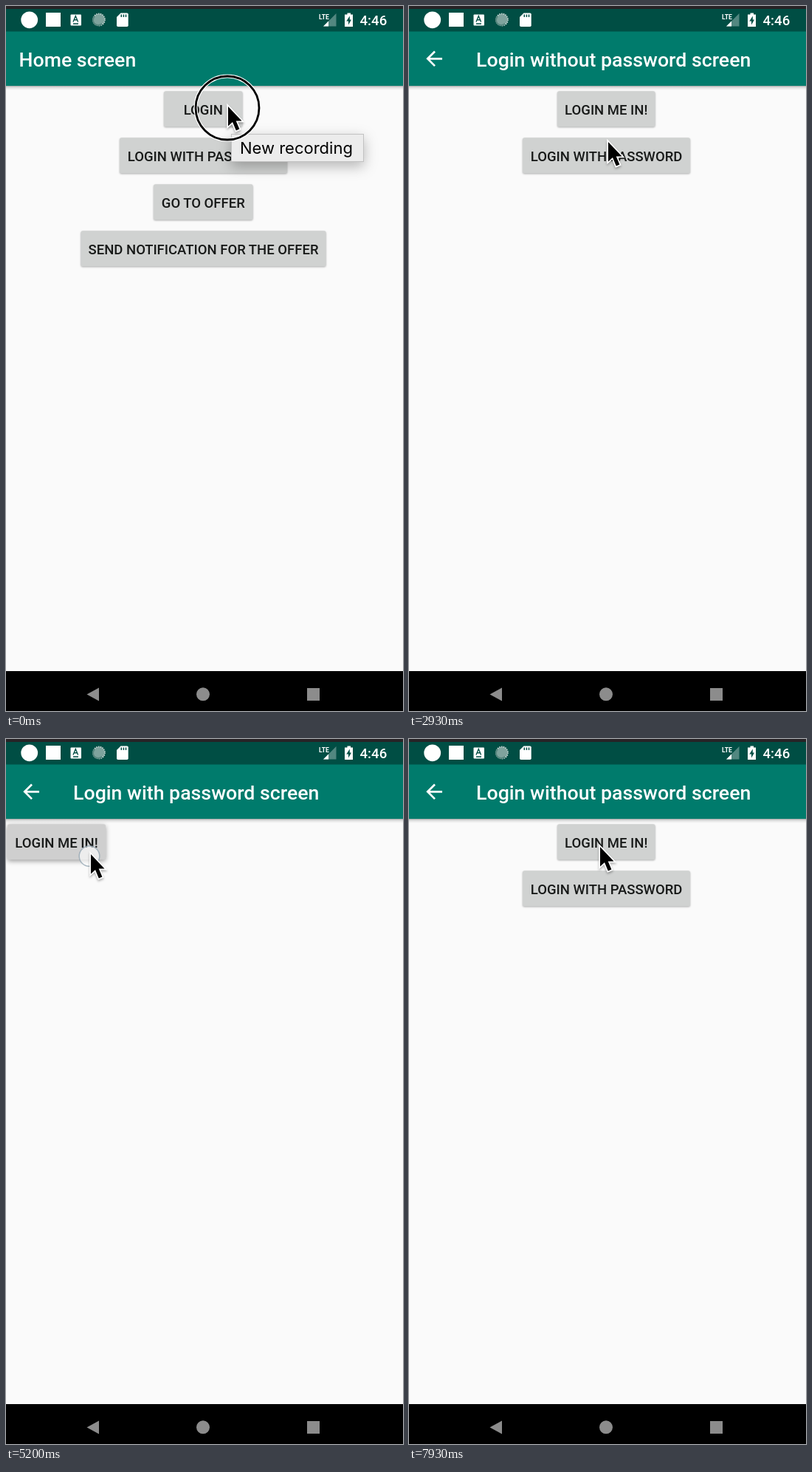
An HTML page that plays this animation: 538x954 px, repeating every 8 s.

```html
<!DOCTYPE html>
<html lang="en">
<head>
<meta charset="utf-8">
<title>Login flow</title>
<style>
  html, body { margin: 0; width: 100%; height: 100%; overflow: hidden; background: #fafafa; }
  svg { display: block; width: 538px; height: 954px; }
  text { font-family: Roboto, sans-serif; font-weight: 500; }
  .title { font-size: 26.7px; fill: #fff; }
  .label { font-size: 18.5px; fill: #171918; text-anchor: middle; }
  .face { fill: #d0d2d1; filter: drop-shadow(0 1.5px 1.2px rgba(0,0,0,.3)); }
  .pressed .face { fill: #cfcfcf; filter: drop-shadow(0 2px 3px rgba(0,0,0,.38)); }
  .tip { filter: drop-shadow(0 6px 9px rgba(0,0,0,.28)); }
  .tip text { font: 400 22px Inter, sans-serif; }
  .pointer { filter: drop-shadow(0 2px 1.5px rgba(0,0,0,.3)); }
</style>
</head>
<body>
<svg viewBox="0 0 538 954">
  <defs>
    <linearGradient id="barShadow" x2="0" y2="1">
      <stop stop-color="#000" stop-opacity=".32"/>
      <stop offset=".4" stop-color="#000" stop-opacity=".1"/>
      <stop offset="1" stop-color="#000" stop-opacity="0"/>
    </linearGradient>
  </defs>
  <g id="screens"></g>

  <path d="M0 0H538V4H0Z" fill="#272326"/>
  <g id="status" fill="#fff">
    <circle cx="31.7" cy="18.8" r="11.4"/>
    <rect x="54" y="9" width="20" height="19"/>
    <rect x="87.5" y="11.5" width="14.5" height="15" rx="1"/>
    <path d="M91 21.5L94.3 13.5L97.6 21.5M92.3 18.7H96.3M91 24H98" fill="none" stroke="#004e44" stroke-width="1.4"/>
    <circle cx="126" cy="18.5" r="8" fill="#7fa39d"/>
    <circle cx="126" cy="18.5" r="8" fill="none" stroke="#c6d6d3" stroke-width="1.8" stroke-dasharray="1.5 1.3"/>
    <path d="M120 14A7 7 0 0 0 130 24" fill="none" stroke="#55857d" stroke-width="2"/>
    <path d="M155.5 9.5H164Q165.7 9.5 165.7 11.2V26.3Q165.7 28 164 28H151.8Q150 28 150 26.3V15Z"/>
    <path d="M156.3 11.5V15M159.4 11.5V15M162.5 11.5V15" stroke="#004e44" stroke-width="1.5"/>
    <text x="424" y="17.5" font-size="8.6" style="font-weight:700">LTE</text>
    <path d="M447.5 10V27.5H430Z" opacity=".32"/>
    <path d="M437 20.5V27.5H430Z"/>
    <path d="M462.5 9.5H467V11.5H470V28H459V11.5H462.5Z"/>
    <path d="M465.8 13.5L461.3 20.5H464V25.5L468 18.5H465.8Z" fill="#004e44"/>
    <text x="479.5" y="25.8" font-size="18.7">4:46</text>
  </g>

  <path d="M0 900H538V954H0Z"/>
  <g fill="#8c8c8c">
    <path d="M109.5 931.5L126 922.5V940.5Z"/>
    <circle cx="267" cy="931.3" r="9"/>
    <rect x="408" y="923" width="17" height="17"/>
  </g>

  <g id="tip" class="tip">
    <rect x="305.5" y="173.5" width="179" height="37" fill="#ececec" stroke="#c2c2c2"/>
    <text x="317" y="200">New recording</text>
  </g>
  <g id="cursor">
    <circle id="spot" cx="-2" cy="2.5" r="13.8" fill="#fff" fill-opacity=".62" stroke="#8fa3b0" stroke-opacity=".75" stroke-width="1.5"/>
    <g id="ring" fill="none">
      <circle cx="-1" cy="2" r="43" stroke="#fff" stroke-width="5"/>
      <circle cx="-1" cy="2" r="43" stroke="#000" stroke-width="2.8"/>
    </g>
    <path class="pointer" d="M0 0V26.5L6 21L10.8 32.5L15.4 30.5L10.7 19.6H18.5Z" stroke="#fff" stroke-width="3.4" paint-order="stroke"/>
  </g>
</svg>
<script>
const LOOP = 8000;
const $ = id => document.getElementById(id);

// Buttons: [label, left, top, width]
const screens = {
  home: { title: 'Home screen', buttons: [
    ['LOGIN', 214, 115, 106.5],
    ['LOGIN WITH PASSWORD', 154, 178, 227],
    ['GO TO OFFER', 200, 241, 134.5],
    ['SEND NOTIFICATION FOR THE OFFER', 101.5, 304, 332]] },
  quick: { title: 'Login without password screen', back: true, buttons: [
    ['LOGIN ME IN!', 201, 115, 132.5],
    ['LOGIN WITH PASSWORD', 154, 178, 227]] },
  secret: { title: 'Login with password screen', back: true, buttons: [
    ['LOGIN ME IN!', 2, 115, 133]] }
};

const buttonMarkup = ([label, x, y, w]) => `<g class="button">
  <rect class="face" x="${x}" y="${y + .3}" width="${w}" height="48" rx="2.5"/>
  <text class="label" x="${x + w / 2}" y="${y + 31.5}">${label}</text></g>`;

const screenMarkup = ([id, { title, back, buttons }]) => `<g id="${id}">
  <path d="M0 0H538V1000H0Z" fill="#fafafa"/>
  <path d="M0 0H538V35H0Z" fill="#004e44"/>
  <path d="M0 34.5H538V108H0Z" fill="#007b6c"/>
  <path d="M0 108H538V114H0Z" fill="url(#barShadow)"/>
  ${back ? '<path d="M45 71.3H26M35 61.5L25.2 71.3L35 81.1" fill="none" stroke="#fff" stroke-width="2.7"/>' : ''}
  <text class="title" x="${back ? 91 : 17.5}" y="81.5">${title}</text>
  ${buttons.map(buttonMarkup).join('')}</g>`;

$('screens').innerHTML = Object.entries(screens).map(screenMarkup).join('');

// Pointer path: [time, x, y]
const path = [
  [0, 301, 136], [200, 301, 136], [870, 285, 143], [1500, 281, 145], [2250, 281, 145],
  [2930, 270, 184], [3450, 264.5, 204], [3700, 264, 205], [4400, 264, 205],
  [5120, 115, 156], [5750, 115, 156], [6650, 267, 166], [6950, 267, 166],
  [7200, 259, 146], [LOOP, 259, 146]
];

// Each tap opens a screen, or closes the current one to show the one below.
const taps = [
  { at: 1850, from: 'home', to: 'quick', button: 0 },
  { at: 4190, from: 'quick', to: 'secret', button: 1 },
  { at: 5150, from: 'secret', to: 'home', button: 0, closing: true },
  { at: 7250, from: 'home', to: 'quick', button: 0 }
];
const HOLD = 110, SLIDE = 74;

const clamp = v => Math.max(0, Math.min(1, v));
const progress = (t, start, length) => clamp((t - start) / length);
const smooth = p => p * p * (3 - 2 * p);
const easeOut = (p, power) => 1 - (1 - p) ** power;

function pointerAt(t) {
  const i = path.findIndex(k => k[0] > t);
  const [t0, x0, y0] = path[i - 1], [t1, x1, y1] = path[i];
  const p = smooth(progress(t, t0, t1 - t0));
  return [x0 + (x1 - x0) * p, y0 + (y1 - y0) * p];
}

function place(id, alpha, dy = 0) {
  const node = $(id);
  node.style.display = alpha > 0 ? '' : 'none';
  node.setAttribute('opacity', alpha);
  node.setAttribute('transform', `translate(0 ${dy})`);
}

function drawScreens(t, tap) {
  const shown = { home: [0], quick: [0], secret: [0] };
  const start = tap ? tap.at + HOLD : 0;
  if (!tap) shown.home = [1];
  else if (t < start) shown[tap.from] = [1];
  else {
    shown[tap.to] = [1];
    if (tap.closing) {
      const p = progress(t, start, 250);
      shown[tap.from] = [1 - progress(t, start + 80, 170), SLIDE * p * p];
    } else {
      const p = progress(t, start, 350);
      if (p < 1) shown[tap.from] = [1];
      shown[tap.to] = [easeOut(progress(t, start, 200), 2), SLIDE * (1 - easeOut(p, 5))];
    }
  }
  for (const id in shown) place(id, ...shown[id]);
}

function draw(t) {
  const tap = taps.filter(k => k.at <= t).pop();
  const since = tap ? t - tap.at : Infinity;
  drawScreens(t, tap);

  document.querySelectorAll('.pressed').forEach(b => b.classList.remove('pressed'));
  if (since < 330) $(tap.from).querySelectorAll('.button')[tap.button].classList.add('pressed');

  $('cursor').setAttribute('transform', `translate(${pointerAt(t)})`);
  $('spot').setAttribute('opacity', since < 130 ? 1 : 0);
  const tapRing = since >= 60 && since < 140 ? 1 : 0;
  $('ring').setAttribute('opacity', Math.max(tapRing, 1 - progress(t, 70, 130)));
  $('tip').setAttribute('opacity', 1 - progress(t, 100, 200));
}

const begin = performance.now();
function tick() {
  draw((performance.now() - begin) % LOOP);
  requestAnimationFrame(tick);
}
draw(0);
requestAnimationFrame(tick);
</script>
</body>
</html>
```
